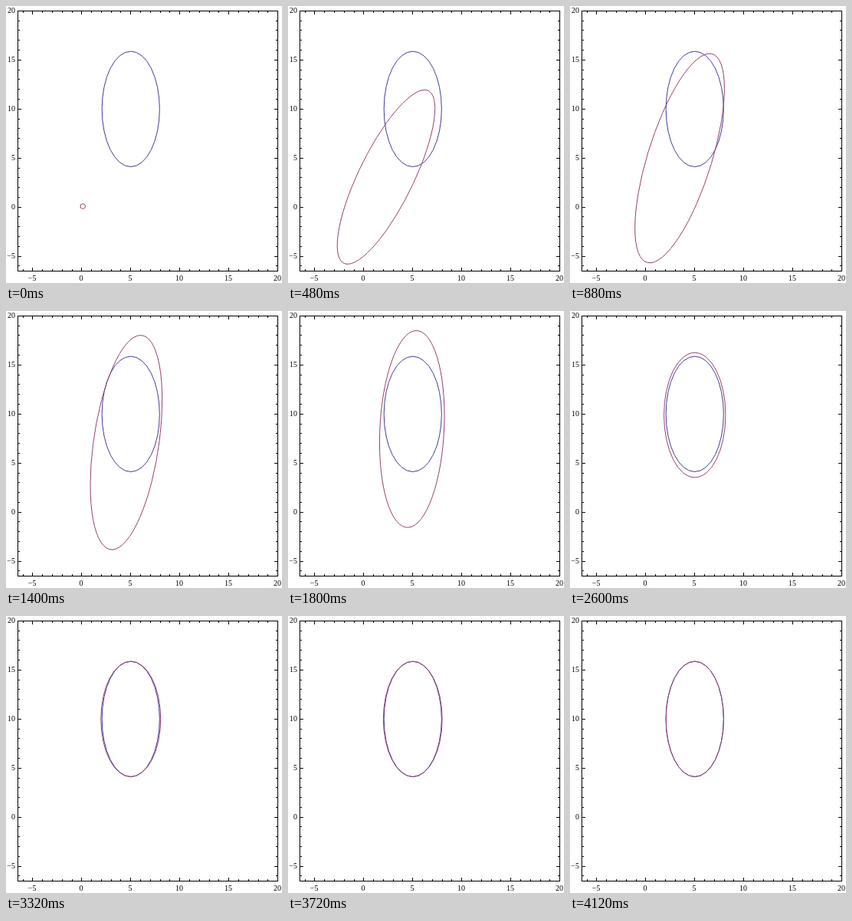
These frames come from a looping animation (360 px wide and 361 px high, 4.2 s). An HTML page:

```html
<!DOCTYPE html>
<html lang="en">
<head>
<meta charset="utf-8">
<title>Ellipse fit</title>
<style>
  html, body { margin: 0; width: 100%; height: 100%; overflow: hidden; background: #fff; }
  svg { display: block; }
  text { font: 10px "Liberation Serif", serif; fill: #000; }
  path { fill: none; stroke: #000; shape-rendering: crispEdges; }
  ellipse { fill: none; stroke-width: 1; vector-effect: non-scaling-stroke; }
</style>
</head>
<body>
<svg width="360" height="361" viewBox="0 0 360 361">
  <path d="M15.5 6.5H354.5V345.5H15.5Z"/>
  <path id="ticks"/>
  <g id="labels"></g>
  <ellipse id="goal" r="1" stroke="#3f3d99"/>
  <ellipse id="fit" rx="1" ry="1" stroke="#993d71"/>
</svg>
<script>
const UNIT = 12.79, LOOP = 4200;
const toX = v => 98.8 + v * UNIT;
const toY = v => 262.2 - v * UNIT;
const GOAL = { cx: toX(5), cy: toY(10), rx: 37.6, ry: 75.2 };

const { exp, sqrt, floor } = Math;
const byId = id => document.getElementById(id);
const snap = v => floor(v) + 0.5;

function setAttrs(el, attrs) {
  for (const name in attrs) el.setAttribute(name, attrs[name]);
}

function addLabel(value, x, y, anchor) {
  const el = document.createElementNS("http://www.w3.org/2000/svg", "text");
  setAttrs(el, { x, y, "text-anchor": anchor });
  el.textContent = String(value).replace("-", "\u2212");
  byId("labels").append(el);
}

function drawAxes() {
  let d = "";
  for (let v = -6; v <= 20; v++) {
    const major = v % 5 === 0, len = major ? 4 : 2;
    const x = snap(toX(v)), y = snap(toY(v));
    d += `M${x} 7v${len}M${x} 345v${-len}M16 ${y}h${len}M354 ${y}h${-len}`;
    if (major) {
      addLabel(v, toX(v) - 0.7, 358, "middle");
      addLabel(v, 11.9, toY(v) + 2.7, "end");
    }
  }
  byId("ticks").setAttribute("d", d);
}

// Steady exponential decay that collapses around step 27
const decay = (k, rate, drop, power) => exp(-rate * k - drop * (k / 27) ** power);
const grow = (k, tau) => 1 - exp(-k / tau);
const bump = (k, width, power) => exp(-((k / width) ** power));

// Centre, half width, half height and correlation of the fitted ellipse
function fitAt(k) {
  return {
    cx: GOAL.cx - 62.5 * decay(k, 0.083, 1.87, 4.4),
    cy: GOAL.cy + 126.7 * decay(k, 0.051, 0.493, 4.5),
    w: 3.3 * exp(-k) + grow(k, 1.6) * (GOAL.rx + 0.107 * (63 - k) + 22.2 * bump(k, 18.2, 3)),
    h: 3.3 * exp(-k) + grow(k, 4.6) * (GOAL.ry + 70 * bump(k, 33.6, 6)),
    r: 0.92 * grow(k, 0.3) * decay(k, 0.022, 1.33, 5)
  };
}

// Three steps every 200 ms, held for 80, 40 and 80 ms
function stepAt(ms) {
  const part = ms % 200;
  return 3 * floor(ms / 200) + (part >= 80) + (part >= 120);
}

function draw(ms) {
  const { cx, cy, w, h, r } = fitAt(stepAt(ms));
  const m = [w, -r * h, 0, h * sqrt(1 - r * r), cx, cy];
  byId("fit").setAttribute("transform", `matrix(${m.map(v => v.toFixed(3))})`);
}

drawAxes();
setAttrs(byId("goal"), GOAL);
draw(0);
let start;
requestAnimationFrame(function tick(now) {
  start ??= now;
  draw((now - start) % LOOP);
  requestAnimationFrame(tick);
});
</script>
</body>
</html>
```
